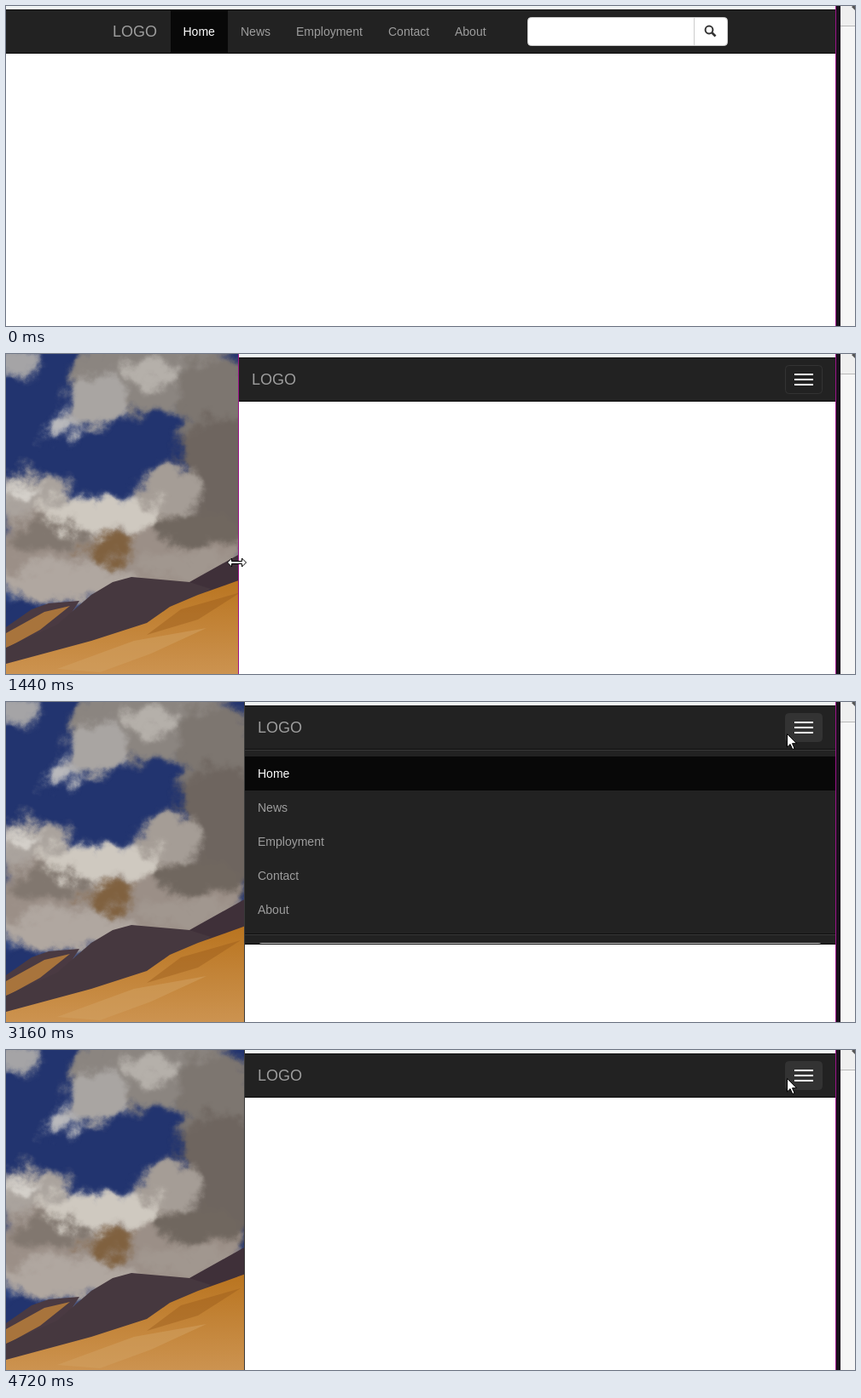
Recreate the animation shown at these times as an HTML page. Size 995 by 376 pixels, loop 5.04 s.

```html
<!DOCTYPE html>
<html lang="en">
<head>
<meta charset="utf-8">
<title>Responsive navbar</title>
<style>
html, body { margin: 0; width: 100%; height: 100%; overflow: hidden; background: #fff; }
svg { display: block; width: 995px; height: 376px; }
text { font: 14px "Liberation Sans", Arial, sans-serif; fill: #9d9d9d; }
.brand { font-size: 18px; }
.on { fill: #fff; }
</style>
</head>
<body>
<svg id="stage" viewBox="0 0 995 376">
  <defs>
    <filter id="puff" x="-20%" y="-20%" width="140%" height="140%" color-interpolation-filters="sRGB">
      <feGaussianBlur stdDeviation="5" result="soft"/>
      <feTurbulence type="fractalNoise" baseFrequency=".035" numOctaves="4" seed="4"/>
      <feDisplacementMap in="soft" scale="38" xChannelSelector="R" yChannelSelector="G"/>
    </filter>
    <linearGradient id="sand" x1="0" y1="0" x2="0" y2="1">
      <stop offset="0" stop-color="#b9741f"/>
      <stop offset="1" stop-color="#cc9350"/>
    </linearGradient>
    <clipPath id="photoClip"><path d="M0 0H281V376H0z"/></clipPath>
    <clipPath id="panelClip"><rect id="panelBox" x="0" y="55" width="972" height="0"/></clipPath>
  </defs>

  <g clip-path="url(#photoClip)">
    <path fill="#22346f" d="M0 0H281V376H0z"/>
    <g id="clouds" filter="url(#puff)"></g>
    <path fill="#4a3a42" d="M0 321 30 300 50 293 86 290 60 330 0 350z"/>
    <path fill="#a8743c" d="M0 328 45 303 75 296 40 324 0 346z"/>
    <path fill="#3f3039" d="M205 276 215 268 281 231V270L215 290z"/>
    <path fill="#46383f" d="M0 345 60 318 100 283 125 268 147 262 215 268 240 276 200 305 110 340 0 366z"/>
    <path fill="url(#sand)" d="M0 364 100 337 165 316 192 297 225 283 281 263V376H0z"/>
    <path fill="#d2a062" opacity=".55" d="M60 370 150 337 235 322 170 352 110 374z"/>
    <path fill="#9a5c1c" opacity=".45" d="M165 330 205 300 275 280 225 312z"/>
  </g>

  <g id="page">
    <rect id="sheet" y="0" width="980" height="376" fill="#fff"/>
    <rect id="strip" y="0" width="980" height="4" fill="#f1f5f5"/>
    <rect id="bar" y="4" width="980" height="52" fill="#222"/>
    <rect id="barTop" y="4" width="980" height="1" fill="#101010"/>
    <rect id="barEnd" y="55" width="980" height="1" fill="#080808"/>
    <text id="brand" class="brand" y="36">LOGO</text>
    <g id="wide"></g>
    <g id="narrow">
      <g clip-path="url(#panelClip)"><g id="panel"></g></g>
      <rect id="toggle" x="913.5" y="13.5" width="43" height="33" rx="4" stroke="#333"/>
      <path fill="#fff" d="M924 23h22v2h-22zM924 29h22v2h-22zM924 35h22v2h-22z"/>
    </g>
    <rect id="edge" y="0" width="1" height="376"/>
  </g>

  <path fill="#f6f6f6" d="M978 0H995V376H978z"/>
  <path fill="#efefef" d="M978 0H995V23H978z"/>
  <path fill="#b8b8b8" d="M978 23H995V24H978z"/>
  <path fill="#555" d="M991 1 995-2V5z"/>
  <path fill="#17101a" d="M973 0H978V376H973z"/>
  <path fill="#9c1288" d="M972 0H973V376H972z"/>

  <path id="resize" fill="#fff" stroke="#000" d="M-11 0l5-5v3.5H6V-5l5 5-5 5V1.5H-6V5z"/>
  <path id="arrow" fill="#fff" stroke="#000" d="M.5.5V16l3.6-3.4 2.7 6 2.3-1-2.6-5.9H11.5z"/>
</svg>
<script>
const LOOP = 5040, TICK = 80, RIGHT = 972, PANEL = 281;
const $ = id => document.getElementById(id);
const set = (id, attrs) => { for (const k in attrs) $(id).setAttribute(k, attrs[k]); };
const place = (id, x, y = 0) => set(id, { transform: `translate(${x} ${y})` });
const show = (id, on) => { $(id).style.display = on ? '' : 'none'; };
const rect = (x, y, w, h, fill) => `<rect x="${x}" y="${y}" width="${w}" height="${h}" fill="${fill}"/>`;
const label = (x, y, s, i) => `<text x="${x}" y="${y}"${i ? '' : ' class="on"'}>${s}</text>`;
const links = ['Home', 'News', 'Employment', 'Contact', 'About'];

const search = (x, y, w) => `<g transform="translate(${x} ${y})">
  <rect x=".5" y=".5" width="${w - 1}" height="33" rx="4" fill="#fff" stroke="#ccc"/>
  <path d="M${w - 39.5} 1v32" stroke="#ccc"/>
  <g transform="translate(${w - 20.5} 16)" fill="none" stroke="#333" stroke-width="2">
    <circle cx="-1.5" cy="-1" r="4.4"/><path d="M2 2.5 6 6.5" stroke-width="2.6"/>
  </g></g>`;

// cx, cy, rx, ry, colour
$('clouds').innerHTML = [
  [175, 25, 105, 45, '#8b8580'], [250, 60, 50, 60, '#7d7670'], [105, 55, 35, 32, '#a9a5a2'],
  [65, 85, 18, 18, '#b9b9bc'], [170, 22, 35, 16, '#b5b0aa'], [15, 10, 22, 18, '#a5a4a6'],
  [255, 150, 55, 80, '#6e655f'], [190, 160, 40, 28, '#a59d96'], [30, 170, 48, 30, '#aaa39d'],
  [120, 235, 160, 55, '#9b8f87'], [110, 190, 75, 24, '#cfc9c0'], [20, 160, 22, 12, '#d4d0ca'],
  [45, 215, 45, 18, '#81776f'], [120, 232, 32, 15, '#80613f'], [225, 205, 50, 22, '#70675f'],
  [70, 270, 85, 24, '#b0a7a0'], [215, 248, 60, 16, '#a1978f'], [2, 285, 10, 12, '#2d437f']
].map(([x, y, rx, ry, c]) => `<ellipse cx="${x}" cy="${y}" rx="${rx}" ry="${ry}" fill="${c}"/>`).join('');

const tabs = [97.5, 165, 230, 338, 416];
$('wide').innerHTML = rect(83, 5, 67, 50, '#080808') +
  links.map((s, i) => label(tabs[i], 35, s, i)).join('') + search(501, 13, 235);

const rule = y => rect(0, y, 700, 1, '#101010') + rect(0, y + 1, 700, 1, '#383838');
$('panel').innerHTML = rule(55) + rect(0, 64, 700, 40, '#080808') +
  links.map((s, i) => label(15, 89 + 40 * i, s, i)).join('') +
  rule(272) + search(15, 283, 662) + rule(327);

// Progress 0..1 in n jumps, the first at a and the last at b
const steps = (t, a, b, n) => t < a ? 0 : t >= b ? 1 : Math.min(n - 1, Math.floor((t - a) / TICK) + 1) / n;
const snap = (t, a) => a + Math.floor((t - a) / TICK) * TICK;
const smooth = p => (1 - Math.cos(Math.PI * p)) / 2;

// CSS "ease" curve
function ease(x) {
  if (x <= 0) return 0;
  if (x >= 1) return 1;
  let lo = 0, hi = 1, u;
  for (let i = 0; i < 24; i++) {
    u = (lo + hi) / 2;
    if (.75 * u * (1 - u) + u ** 3 < x) lo = u; else hi = u;
  }
  return .3 * u * (1 - u) ** 2 + 3 * u * u * (1 - u) + u ** 3;
}

function leftEdge(t, settle) {
  return Math.round(-1 + 218 * smooth(steps(t, 80, 600, 8)) + (t >= settle ? 3 : 0) +
    53 * steps(t, 1240, 1440, 3) + (t >= 2000 ? 7 : 0));
}

function panelHeight(t) {
  if (t < 3000) return 0;
  const p = t < 4400 ? ease((snap(t, 3000) - 2980) / 350) : 1 - ease((snap(t, 4400) - 4317) / 350);
  return Math.round(PANEL * p);
}

function draw(t) {
  const edge = leftEdge(t, 680), left = leftEdge(t, 840);
  const wide = RIGHT - left >= 768;
  const box = wide ? Math.floor((left + RIGHT) / 2 - 375) : left;
  const h = panelHeight(t);

  for (const id of ['sheet', 'strip', 'bar', 'barTop', 'barEnd']) set(id, { x: edge });
  set('bar', { height: 52 + h });
  set('barEnd', { y: 55 + h });
  set('edge', { x: edge - 1, fill: t >= 1240 && t < 2000 ? '#9c1288' : '#3a3a3a' });
  set('brand', { x: box + 15 });
  show('wide', wide);
  show('narrow', !wide);
  place('wide', box);
  place('panel', left);
  set('panelBox', { height: h });
  set('toggle', { fill: t >= 2840 ? '#333' : '#222' });

  const drag = t < 2160;
  show('resize', drag && t >= 80);
  show('arrow', !drag);
  place('resize', edge - 2.5, 239 + 6 * steps(t, 1240, 1440, 3));
  const go = smooth(steps(t, 2160, 2680, 8)), hop = steps(t, 2760, 2840, 2);
  place('arrow', Math.round(281 + 603 * go + 31 * hop),
    Math.round(242 - 186 * go - 19 * hop) - (t >= 4640 ? 4 : 0));
}

const start = performance.now();
function frame() {
  draw((performance.now() - start) % LOOP);
  requestAnimationFrame(frame);
}
draw(0);
requestAnimationFrame(frame);
</script>
</body>
</html>
```
